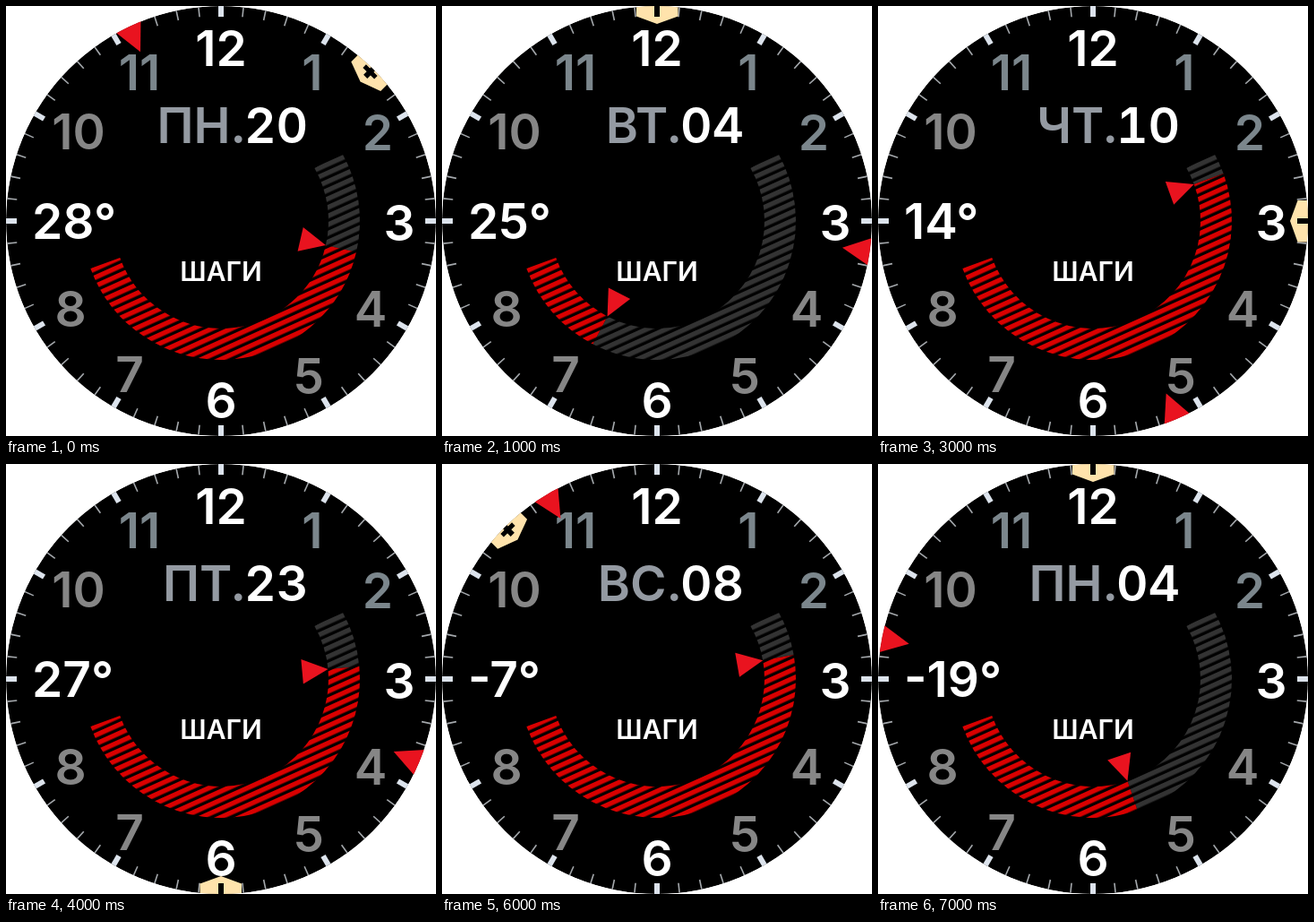
Recreate the animation shown at these times as an HTML page. Size 480 px wide and 480 px high, loop 8 s.

```html
<!DOCTYPE html>
<html lang="ru">
<head>
<meta charset="utf-8">
<style>
  html, body { margin: 0; width: 100%; height: 100%; overflow: hidden; background: #fff; }
  svg { display: block; width: 100vw; height: 100vh; }
  text { font: 600 55px Inter, sans-serif; fill: #fff; }
  .mid { text-anchor: middle; }
  #day { fill: #949aa2; text-anchor: end; }
  #date { font-variant-numeric: tabular-nums; }
  #label { font-size: 30px; }
</style>
</head>
<body>
<svg viewBox="0 0 480 480">
  <defs>
    <clipPath id="face"><circle cx="240" cy="240" r="240"/></clipPath>
    <pattern id="grey" width="10" height="8.8" patternUnits="userSpaceOnUse" patternTransform="rotate(-24.2) translate(0 6.5)">
      <rect width="10" height="5.4" fill="#333"/>
    </pattern>
    <pattern id="red" width="10" height="8.8" patternUnits="userSpaceOnUse" patternTransform="rotate(-24.2) translate(0 6.5)">
      <rect width="10" height="5.4" fill="#d90000"/>
    </pattern>
  </defs>
  <g clip-path="url(#face)">
    <circle cx="240" cy="240" r="240"/>
    <g id="ticks"></g>
    <g id="hours"></g>
    <text id="day" x="268" y="153"></text>
    <text id="date" x="266" y="153"></text>
    <text id="temp" x="29" y="260"></text>
    <text id="label" class="mid" x="240" y="307">ШАГИ</text>
    <g fill="none" stroke-width="35">
      <path id="track" stroke="url(#grey)" pathLength="1"/>
      <path id="done" stroke="url(#red)"/>
    </g>
    <path id="steps" d="M360 240L331 226.3V253.7Z" fill="#e9131f"/>
    <g id="badge">
      <path d="M217 -4V11.5L240 20L263.5 11.5V-4Z" fill="#ffe3ac"/>
      <path d="M237 -4H243V12H237Z"/>
      <path id="bar" d="M231 2H249V7H231Z"/>
    </g>
    <path id="pointer" d="M240 31L224.5 -0.5H255.5Z" fill="#e9131f"/>
  </g>
</svg>
<script>
const START = 160, END = -29.5, RADIUS = 137.5;
const $ = id => document.getElementById(id);

// day, date, temperature, pointer angle, badge angle, end of the steps arc
const states = [
  ['ПН.', '20', '28°', 334.5, 45, 13],
  ['ВТ.', '04', '25°', 98.2, 0, 117.5],
  ['СР.', '19', '-13°', 279.7, 90, END],
  ['ЧТ.', '10', '14°', 157, 90, -20],
  ['ПТ.', '23', '27°', 112.8, 180, -5.2],
  ['СБ.', '14', '--', 29.3, 315, 134],
  ['ВС.', '08', '-7°', 329, 315, -10],
  ['ПН.', '04', '-19°', 280.8, 0, 71.3]
];

// centre x and baseline of 1 to 12
const hours = [
  [342, 94], [415, 161], [439, 262], [407, 358], [338, 433], [240, 460],
  [138, 431], [72, 358], [40, 262], [81, 160], [149, 94], [240, 67]
];

function hourText([x, y], i) {
  const n = i + 1;
  if (n === 9) return '';
  const color = n % 3 === 0 ? '#fff' : n < 3 || n === 11 ? '#7b868c' : '#868686';
  return `<text class="mid" x="${x}" y="${y}" style="fill:${color}">${n}</text>`;
}

function tick(i) {
  const major = i % 5 === 0;
  return `<path d="M240 0V${major ? 12 : 11}" stroke="${major ? '#dce3ec' : '#a4a8ac'}"
    stroke-width="${major ? 6 : 1.6}" transform="rotate(${i * 6} 240 240)"/>`;
}

function arc(end) {
  const point = deg => {
    const a = deg * Math.PI / 180;
    return `${240 + RADIUS * Math.cos(a)} ${240 + RADIUS * Math.sin(a)}`;
  };
  return `M${point(START)}A${RADIUS} ${RADIUS} 0 ${+(START - end > 180)} 0 ${point(end)}`;
}

function turn(id, angle) {
  $(id).setAttribute('transform', `rotate(${angle} 240 240)`);
}

function show([day, date, temp, pointer, badge, end]) {
  $('day').textContent = day;
  $('date').textContent = date;
  $('temp').textContent = temp;
  $('done').setAttribute('d', arc(end));
  // hide the grey stripes beneath the finished part
  const share = (START - end) / (START - END);
  $('track').setAttribute('stroke-dasharray', `0 ${share} ${1 - share} 1`);
  turn('steps', end);
  turn('pointer', pointer);
  turn('badge', badge);
  $('bar').setAttribute('visibility', badge % 90 ? 'visible' : 'hidden');
}

$('ticks').innerHTML = Array.from({ length: 60 }, (_, i) => tick(i)).join('');
$('hours').innerHTML = hours.map(hourText).join('');
$('track').setAttribute('d', arc(END));

function frame() {
  show(states[Math.floor(performance.now() / 1000) % states.length]);
  requestAnimationFrame(frame);
}
frame();
</script>
</body>
</html>
```
